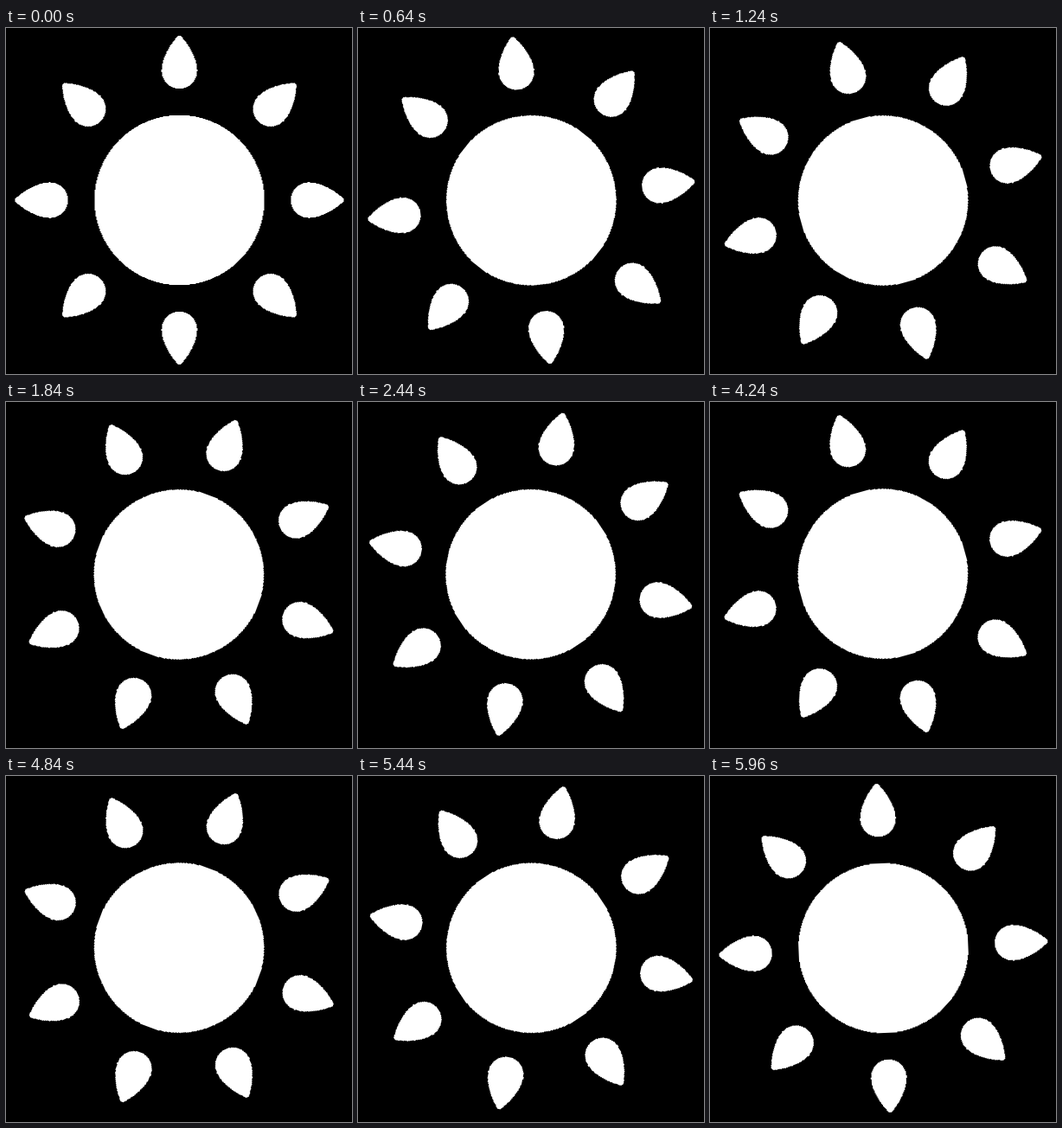
These frames come from a looping animation (400 by 400 pixels, 6 s). An HTML page:

```html
<!DOCTYPE html>
<html lang="en">
<head>
<meta charset="utf-8">
<title>Turning sun</title>
<style>
  html, body { margin: 0; width: 100%; height: 100%; overflow: hidden; background: #000; }
  svg { display: block; width: 100%; height: 100%; shape-rendering: crispEdges; }
  /* 150 steps of 40 ms, one full turn */
  .sun { fill: #fff; transform-origin: 0 0; animation: turn 6s steps(150) infinite; }
  @keyframes turn { to { transform: rotate(360deg); } }
</style>
</head>
<body>
<svg viewBox="0 0 400 400">
  <defs>
    <path id="ray" d="M-.8-190.2Q0-191 .8-190.2C10.4-181.8 20.6-163.4 20.6-149.5A20.6 20.6 0 0 1-20.6-149.5C-20.6-163.4-10.4-181.8-.8-190.2Z"/>
    <g id="pair">
      <use href="#ray"/>
      <use href="#ray" transform="rotate(180)"/>
    </g>
  </defs>
  <g transform="translate(200 199)">
    <g class="sun">
      <!-- the sun sits slightly off its pivot -->
      <g transform="translate(.45 0)">
        <circle r="98.3"/>
        <use href="#pair"/>
        <use href="#pair" transform="rotate(45)"/>
        <use href="#pair" transform="rotate(90)"/>
        <use href="#pair" transform="rotate(135)"/>
      </g>
    </g>
  </g>
</svg>
</body>
</html>
```
